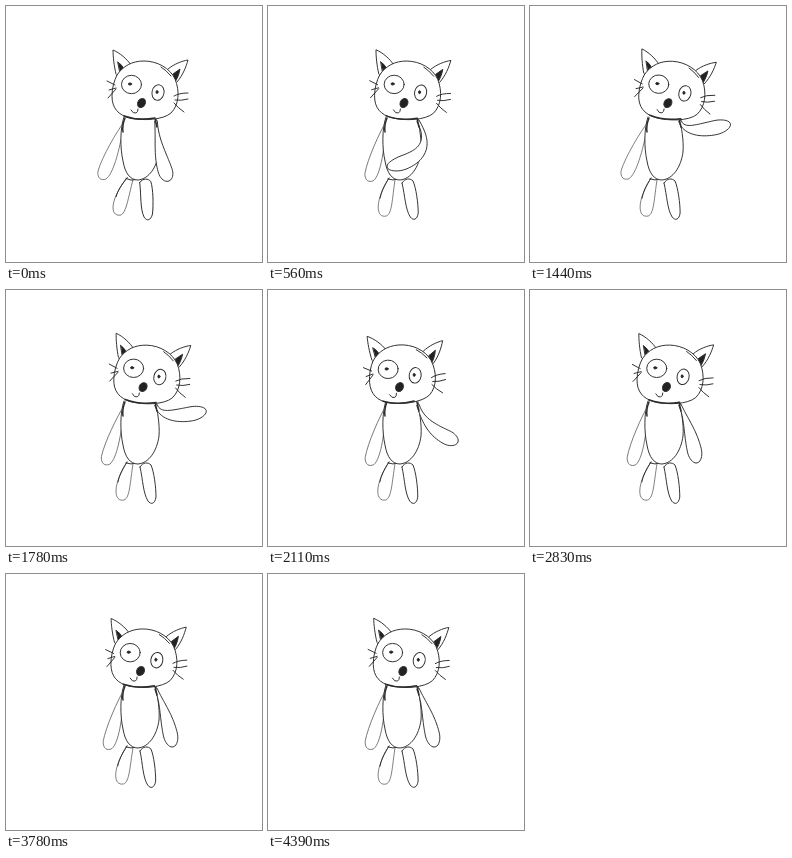
Animation of 256x256 px, one loop 4.45 s. Source, as an HTML page:

```html
<!DOCTYPE html>
<html lang="en">
<head>
<meta charset="utf-8">
<title>Waving cat</title>
<style>
html, body { margin: 0; width: 100%; height: 100%; overflow: hidden; background: #fff; }
svg { display: block; width: 100vw; height: 100vh; }
path, ellipse { fill: none; stroke: #2c2c2c; stroke-width: .95; stroke-linecap: round; stroke-linejoin: round; }
.paper { fill: #fff; }
.ink { fill: #222; }
.thin { stroke-width: .75; stroke: #555; }
.bold { stroke-width: 1.5; }
</style>
</head>
<body>
<svg viewBox="0 0 256 256">
  <g id="leftLeg">
    <path class="paper thin" d="M121 172C115 181 110 193 110 201C110 208 113 211 118 210C124 208 124 192 127 174"/>
    <path d="M121 172C116 180 113 186 112 192M120 173Q125 175 130 173"/>
  </g>
  <g id="rightLeg">
    <path class="paper" d="M134 177C137 172 142 172 145 175C148 182 150 197 150 207C149 214 145 215 142 211C137 203 137 190 134 177"/>
  </g>
  <g id="leftArm">
    <path class="paper thin" d="M118 116C111 125 96 151 92 165C91 172 95 175 100 173C107 168 113 147 118 118"/>
  </g>
  <path class="paper" d="M118 111C114 122 114 142 117 155C119 167 124 174 132 174C143 173 151 161 153 146C154 133 151 122 150 112"/>
  <path class="bold" d="M119 112C117 117 116 120 117 126"/>
  <path id="rightArm" class="paper"/>
  <path class="bold" d="M149 112Q150 117 151 121"/>
  <g id="head">
    <path class="paper" d="M110 68C108 60 107 50 107 44C114 47 121 53 125 59"/>
    <path class="paper" d="M162 63C168 58 176 55 182 54C180 61 177 69 171 76"/>
    <path class="ink" d="M112 56Q117 59 119 66L114 66Z"/>
    <path class="ink" d="M167 68L174 63C173 69 171 73 169 76Z"/>
    <path class="paper" d="M111 69C117 60 126 55 138 55C151 55 164 62 169 73C174 85 173 99 165 107C157 114 137 115 124 112C112 109 106 102 106 90C106 82 108 75 111 69Z"/>
    <path class="bold" d="M118 110Q132 115 149 112"/>
    <path d="M155 61Q160 64 165 70"/>
    <ellipse cx="125.5" cy="78.5" rx="10" ry="9.2"/>
    <ellipse class="ink" cx="124" cy="78" rx="1.6" ry="1.1"/>
    <ellipse cx="152" cy="86.5" rx="6" ry="7.8" transform="rotate(12 152 86.5)"/>
    <ellipse class="ink" cx="151" cy="86" rx="1" ry="1.5"/>
    <ellipse class="ink" cx="135.5" cy="97" rx="3.7" ry="4.7" transform="rotate(32 135.5 97)"/>
    <path d="M125 104Q127 108 130 107Q132 106 132 103"/>
    <path d="M101 75L109 79M103 84L110 82M102 92L110 83"/>
    <path d="M168 90Q173 87 182 87M169 94Q175 95 182 93M168 97Q172 102 178 106"/>
  </g>
</svg>
<script>
const LOOP = 4450, STEP = LOOP / 80;
const SHOULDER = [150, 115];
const part = id => document.getElementById(id);

// Arm poses: elbow x, y, then hand x, y.
const start = [152, 148, 163, 175];
const across = [171, 151, 119, 161];
const raised = [155, 131, 202, 115];
const low = [158, 141, 190, 152];
const hang = [160, 137, 167, 173];
const armMoves = [[0, start], [500, across], [800, across], [1080, hang],
  [1440, raised], [1670, raised], [2110, low], [2600, hang]];

// Turning points of the head's sway, in degrees.
const headMoves = [[0, [0]], [280, [4]], [860, [-3.5]], [1600, [4]],
  [2110, [-4.3]], [3250, [4]], [4120, [-3.5]], [4390, [-.7]]];

function pose(moves, t) {
  const next = moves.findIndex(([time]) => time > t);
  if (next < 0) return moves[moves.length - 1][1];
  const [t0, a] = moves[next - 1], [t1, b] = moves[next];
  const ease = (1 - Math.cos(Math.PI * (t - t0) / (t1 - t0))) / 2;
  return a.map((v, i) => v + (b[i] - v) * ease);
}

// Smooth hump: 1 at the centre, 0 beyond the reach.
function bump(t, centre, reach) {
  const u = Math.min(1, Math.abs(t - centre) / reach);
  return Math.cos(u * Math.PI / 2) ** 2;
}

// Tapered tube along a quadratic curve, with a rounded hand.
function armPath([ex, ey, hx, hy]) {
  const [sx, sy] = SHOULDER, left = [], right = [], count = 28;
  for (let i = 0; i <= count; i++) {
    const u = 1 - (1 - i / count) ** 1.5, v = 1 - u;
    const x = v * v * sx + 2 * u * v * ex + u * u * hx;
    const y = v * v * sy + 2 * u * v * ey + u * u * hy;
    const dx = v * (ex - sx) + u * (hx - ex), dy = v * (ey - sy) + u * (hy - ey);
    const cap = Math.sqrt(1 - Math.max(0, (u - .82) / .18) ** 2) || 0;
    const w = (1.3 + 5.8 * (1 - bump(u, 0, .85))) * cap / Math.hypot(dx, dy);
    left.push(`${(x + dy * w).toFixed(2)} ${(y - dx * w).toFixed(2)}`);
    right.unshift(`${(x - dy * w).toFixed(2)} ${(y + dx * w).toFixed(2)}`);
  }
  return "M" + left.concat(right).join("L");
}

function turn(id, angle, x, y) {
  part(id).setAttribute("transform", `rotate(${angle} ${x} ${y})`);
}

function draw(time) {
  const t = Math.floor((time % LOOP + 4) / STEP) * STEP;
  const settle = bump(t, 0, 500);
  const leg = 6 * settle + .6 * Math.sin(10 * Math.PI * t / LOOP);
  turn("head", pose(headMoves, t)[0], 134, 150);
  turn("leftArm", 6 * settle + 7.5 * bump(t, 1260, 800) - 6, 118, 117);
  turn("leftLeg", leg, 124, 173);
  turn("rightLeg", leg, 139, 174);
  part("rightArm").setAttribute("d", armPath(pose(armMoves, t)));
}

const begin = performance.now();
function tick() {
  draw(performance.now() - begin);
  requestAnimationFrame(tick);
}
tick();
</script>
</body>
</html>
```
